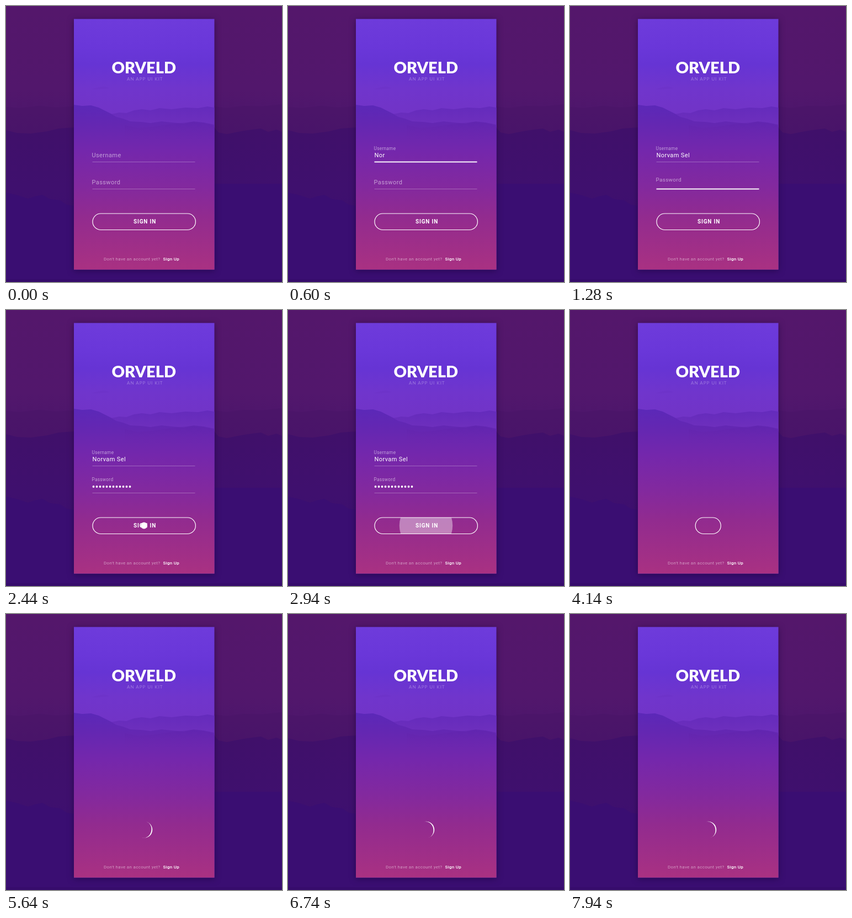
Write an HTML page that moves like this. It is 500x500 px and loops after 8000 ms.

```html
<!DOCTYPE html>
<html lang="en">
<head>
<meta charset="utf-8">
<title>Sign in</title>
<style>
html, body { margin: 0; width: 100%; height: 100%; overflow: hidden; background: #3a0d72; }
svg { display: block; width: 100%; height: 100%; }
text { fill: #fff; font: 11px Roboto, sans-serif; letter-spacing: .4px; }
#brand { font: 900 29px Lato, sans-serif; letter-spacing: 0; }
#tag { font: 8px Lato, sans-serif; letter-spacing: 1px; opacity: .33; }
#signIn { font-size: 10px; font-weight: 700; letter-spacing: .8px; }
.foot { font-size: 8px; letter-spacing: .3px; }
.label { opacity: .55; }
.card { filter: drop-shadow(0 2px 6px rgba(20, 0, 50, .5)); }
</style>
</head>
<body>
<svg viewBox="0 0 500 500">
  <defs>
    <linearGradient id="night" x2="0" y2="1">
      <stop stop-color="#54176b"/><stop offset=".3" stop-color="#52176c"/><stop offset=".46" stop-color="#49156b"/>
    </linearGradient>
    <linearGradient id="hill" x2="0" y2="1">
      <stop stop-color="#40106a"/><stop offset=".4" stop-color="#3f106e"/><stop offset="1" stop-color="#390e70"/>
    </linearGradient>
    <linearGradient id="sky" x2="0" y2="1">
      <stop stop-color="#6e3bdb"/><stop offset=".11" stop-color="#6a37d9"/><stop offset=".18" stop-color="#6634d4"/>
      <stop offset=".28" stop-color="#7035cc"/><stop offset=".42" stop-color="#7233c4"/>
    </linearGradient>
    <linearGradient id="far" x2="0" y2="1">
      <stop stop-color="#642bbc"/><stop offset="1" stop-color="#7030bd"/>
    </linearGradient>
    <linearGradient id="near" gradientUnits="userSpaceOnUse" x1="0" y1="179" x2="0" y2="477">
      <stop stop-color="#5b28b8"/><stop offset=".12" stop-color="#6427b2"/><stop offset=".28" stop-color="#7427ac"/>
      <stop offset=".5" stop-color="#83299e"/><stop offset=".68" stop-color="#922b8f"/><stop offset="1" stop-color="#a93182"/>
    </linearGradient>
    <linearGradient id="mist" x2="0" y2="1">
      <stop stop-color="#5e22ac" stop-opacity=".45"/><stop offset="1" stop-color="#7427ac" stop-opacity="0"/>
    </linearGradient>
    <clipPath id="pill"><rect class="pill" y="376" height="29.5" rx="14.75"/></clipPath>
  </defs>

  <rect width="500" height="500" fill="url(#night)"/>
  <path fill="#4a1468" opacity=".6" d="M0 183L25 185 60 181 90 184 123 182H377L400 185 430 181 465 182 500 178V260H0Z"/>
  <path fill="url(#hill)" d="M0 225L20 230 45 231 75 227 95 222 123 220H377L385 229 400 232 425 227 445 224 462 222 475 228 490 224 500 228V500H0Z"/>
  <path fill="#3a0e72" d="M0 338L22 343 40 349 52 345 66 342 80 350 98 352 110 360 123 362V322H500V500H0Z"/>
  <rect y="495" width="500" height="5" fill="#330b65" opacity=".5"/>

  <rect class="card" x="123" y="23.5" width="254.5" height="454" fill="url(#sky)"/>
  <path fill="#6b32c6" opacity=".5" d="M155 151L166 148 177 146 187 149 175 150Z"/>
  <path fill="url(#far)" d="M190 196L205 193 218 194 232 189 246 187 262 189 278 185 300 187 325 184 348 185 365 182 377.5 184V220H190Z"/>
  <path fill="url(#near)" d="M123 179L138 181 154 180 168 184 180 190 190 195 200 201 212 204 225 209 245 210 262 212 282 209 300 211 322 213 340 209 358 211 377.5 215V477.5H123Z"/>
  <path fill="url(#mist)" d="M215 216L240 221 265 219 285 216 305 213 335 210 358 212 377.5 217V250H215Z"/>

  <text id="brand" x="191.5" y="122">ORVELD</text>
  <text id="tag" x="219" y="135">AN APP UI KIT</text>
  <text class="foot" x="177" y="461" opacity=".5">Don't have an account yet?</text>
  <text class="foot" x="284.5" y="461" style="font-weight:500">Sign Up</text>

  <g id="form">
    <text class="label" id="userLabel">Username</text>
    <text id="user" x="156.5" y="274"></text>
    <rect class="line" id="userLine" x="156.5" width="186"/>
    <text class="label" id="passLabel">Password</text>
    <g id="dots" fill="#fff"></g>
    <rect class="line" id="passLine" x="156.5" width="186"/>
  </g>

  <text id="signIn" x="231" y="394">SIGN IN</text>
  <circle id="ripple" cx="250" cy="390.5" fill="#fff" clip-path="url(#pill)"/>
  <rect class="pill" id="button" y="376" height="29.5" rx="14.75" fill="none" stroke="#fff" stroke-width="1.2"/>
  <path id="spinner" d="M0-15A15 15 0 0 1 0 15A13.2 15 0 0 0 0-15Z" fill="#fff"/>
</svg>
<script>
const $ = id => document.getElementById(id);
const LOOP = 8000, NAME = 'Norvam Sel', DOTS = 12;
const ramp = (t, a, b) => Math.min(1, Math.max(0, (t - a) / (b - a)));
const smooth = x => x * x * (3 - 2 * x);
const mix = (a, b, x) => a + (b - a) * x;
const set = (el, attrs) => { for (const k in attrs) el.setAttribute(k, attrs[k]); };

// piecewise linear curve through [time, value] points
function curve(t, points) {
  let i = 1;
  while (i < points.length - 1 && t > points[i][0]) i++;
  const [a, u] = points[i - 1], [b, v] = points[i];
  return mix(u, v, ramp(t, a, b));
}

const dots = Array.from({ length: DOTS }, (_, i) => {
  const dot = document.createElementNS('http://www.w3.org/2000/svg', 'circle');
  set(dot, { cx: 158.5 + 6 * i, cy: 320, r: 1.9 });
  return $('dots').appendChild(dot);
});

function field(id, t, base, focus, blur) {
  const up = smooth(ramp(t, focus, focus + 450));
  const lit = ramp(t, focus, focus + 180) - ramp(t, blur, blur + 200);
  set($(id + 'Label'), { transform: `translate(155.5 ${base - 13 * up}) scale(${1 - .25 * up})` });
  const height = mix(1, 1.9, lit);
  set($(id + 'Line'), { y: base + 8.5 - height / 2, height, fill: `rgba(255,255,255,${mix(.28, 1, lit)})` });
}

function draw(t) {
  if (t > 2540) t = 2540 + Math.floor((t - 2540) / 100) * 100;

  field('user', t, 274, 60, 1000);
  field('pass', t, 323, 1080, 2000);
  $('user').textContent = NAME.slice(0, Math.round(NAME.length * ramp(t, 400, 980)));
  const typed = Math.round(DOTS * ramp(t, 1400, 1900));
  dots.forEach((dot, i) => set(dot, { opacity: i < typed ? 1 : 0 }));

  const leave = ramp(t, 3200, 3860);
  set($('form'), { transform: `translate(0 ${-10 * leave ** 1.6})`, opacity: 1 - smooth(leave) });

  set($('ripple'), {
    r: curve(t, [[2240, 0], [2440, 6], [2540, 9.5], [3340, 87], [3540, 100]]),
    opacity: curve(t, [[2540, 1], [2740, .62], [3040, .3], [3340, .1], [3540, 0]])
  });
  set($('signIn'), { opacity: 1 - ramp(t, 3400, 3740) });

  const width = mix(30, 186.5, (1 - ramp(t, 3440, 4540)) ** 2.25);
  document.querySelectorAll('.pill').forEach(el => set(el, { x: 250.2 - width / 2, width }));
  set($('button'), { opacity: 1 - ramp(t, 4500, 4900) });
  set($('spinner'), {
    opacity: ramp(t, 4440, 4740),
    transform: `translate(250.2 390.8) rotate(${15 + (t - 5640) * .3})`
  });
}

let start;
function tick(now) {
  start ??= now;
  draw((now - start) % LOOP);
  requestAnimationFrame(tick);
}
draw(0);
requestAnimationFrame(tick);
</script>
</body>
</html>
```
